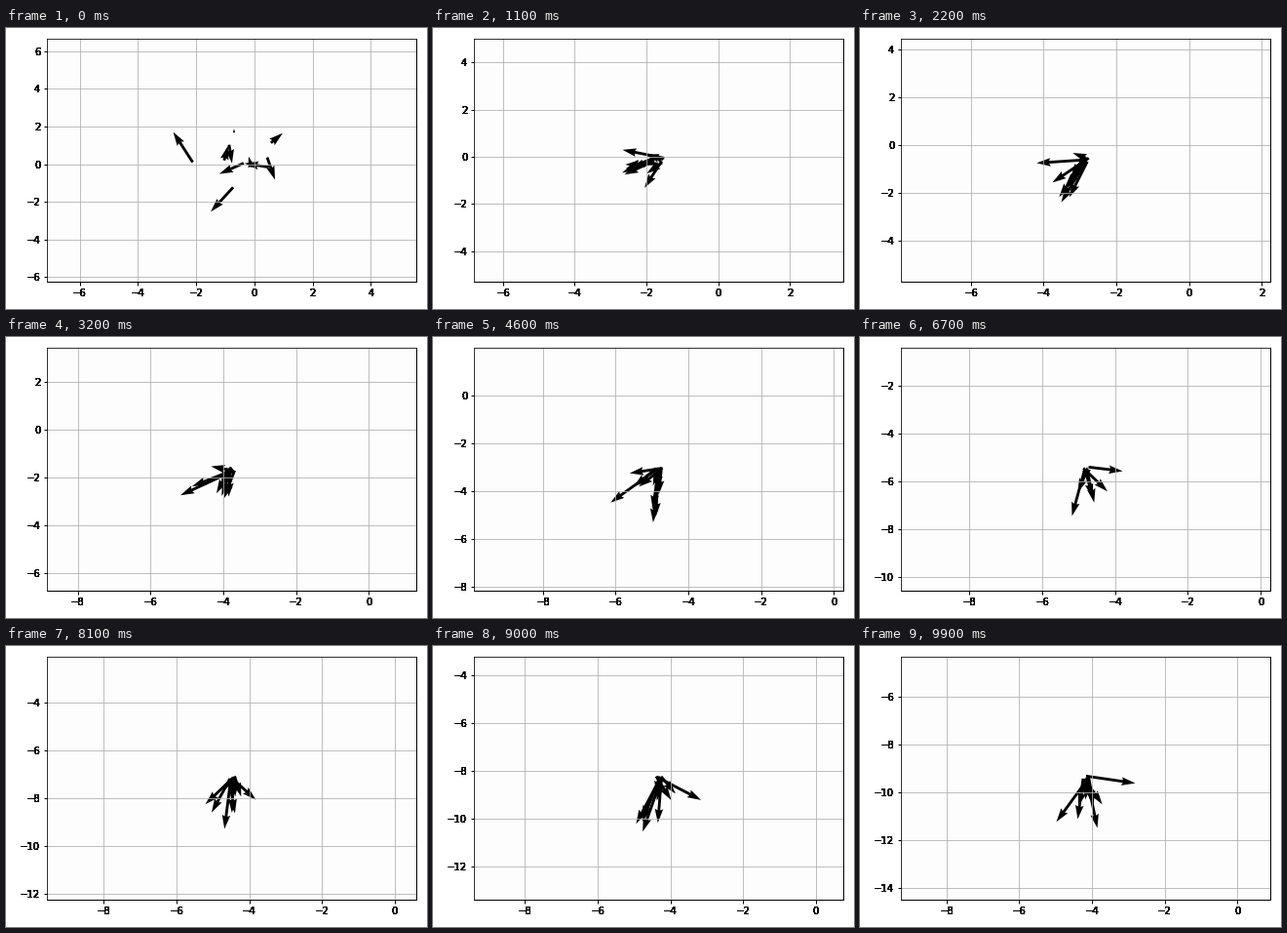
Recreate the animation shown at these times as a matplotlib script. Size 432 by 288 pixels, loop 10 s.

```python
import numpy as np
import matplotlib.pyplot as plt
from matplotlib.animation import FuncAnimation
from matplotlib.artist import Artist

W, H, DPI = 432, 288, 72
FRAMES, AGENTS, MARGIN = 100, 10, 5
EXTENT = np.array([0.075, 0.08])  # half size of the gathered flock

# Starting state of each agent: x, y and heading in points
START = np.array([(-2.12, 0.10, -20, 31), (-0.37, 0.05, -25, -11), (0.50, -0.16, -25, 4),
                  (-0.73, -1.23, -23, -25), (-1.04, 0.20, 4, 15), (-0.10, -0.16, -3, 11),
                  (-0.87, 1.03, 3, -19), (0.44, 0.36, 8, -23), (-0.70, 1.67, 0, 4),
                  (0.57, 1.13, 12, 10)])

# Step, x and y of the points that the flock passes
ROUTE = np.array([(0, -0.35, 0.10), (22, -2.845, -0.64), (32, -3.763, -1.635),
                  (46, -4.813, -3.09), (67, -4.805, -5.483), (81, -4.48, -7.173),
                  (99, -4.17, -9.40)])

rng = np.random.default_rng(4)


def smooth_path(t, keys, steps):
    """Cubic curve through the key points."""
    slope = np.gradient(keys, t, axis=0)
    i = np.clip(np.searchsorted(t, steps, side="right") - 1, 0, len(t) - 2)
    span = (t[i + 1] - t[i])[:, None]
    s = (steps - t[i])[:, None] / span
    rise = s * s * (3 - 2 * s)
    bend = s * (1 - s) ** 2 * slope[i] + s * s * (s - 1) * slope[i + 1]
    return keys[i] + rise * (keys[i + 1] - keys[i]) + span * bend


def noise(*shape):
    """Random values of unit spread that drift over three steps."""
    raw = rng.normal(size=(FRAMES, AGENTS) + shape)
    return (np.roll(raw, 1, axis=0) + raw + np.roll(raw, -1, axis=0)) / np.sqrt(3)


centre = smooth_path(ROUTE[:, 0], ROUTE[:, 1:], np.arange(FRAMES))
drift = np.gradient(centre, axis=0)
fade = np.exp(-np.arange(FRAMES) / 5)[:, None, None]

spots = noise(2)
low, high = spots.min(axis=1, keepdims=True), spots.max(axis=1, keepdims=True)
spots = EXTENT * (2 * (spots - low) / (high - low) - 1)
pos = centre[:, None] + fade * (START[:, :2] - centre[0]) + (1 - fade) * spots

# Headings fan out around the direction of the drift
angle = np.arctan2(drift[:, 1], drift[:, 0])[:, None] + 0.5 * noise()
length = np.clip(33 + 15 * noise(), 3, 60)
fan = length[..., None] * np.stack([np.cos(angle), np.sin(angle)], axis=-1)
heading = fade * START[:, 2:] + (1 - fade) * fan


class DarkLabels(Artist):
    """Repaints the tick labels so that their soft edges turn black."""

    def draw(self, renderer):
        for axis in (ax.xaxis, ax.yaxis):
            for label in axis.get_ticklabels():
                for _ in range(12):
                    label.draw(renderer)


fig = plt.figure(figsize=(W / DPI, H / DPI), dpi=DPI, facecolor="white")
ax = fig.add_axes([42.3 / W, 28.2 / H, 378.9 / W, 249 / H], facecolor="#fdfdfd")
ax.grid(True)
ax.tick_params(width=1, labelsize=10, labelfontfamily="DejaVu Sans")
for side in ("right", "bottom"):
    ax.spines[side].set_linewidth(1)
fig.add_artist(DarkLabels())

quiver = ax.quiver(*pos[0].T, *heading[0].T, color="black",
                   angles="uv", scale_units="inches", scale=72)


def ticks(lo, hi):
    return np.arange(2 * np.ceil(lo / 2), hi, 2)


def update(n):
    quiver.set_offsets(pos[n])
    quiver.set_UVC(*heading[n].T)
    (x0, y0), (x1, y1) = pos[n].min(axis=0) - MARGIN, pos[n].max(axis=0) + MARGIN
    ax.set_xticks(ticks(x0, x1))
    ax.set_yticks(ticks(y0, y1))
    ax.set_xlim(x0, x1)
    ax.set_ylim(y0, y1)
    return (quiver,)


anim = FuncAnimation(fig, update, frames=FRAMES, interval=100, repeat=True,
                     repeat_delay=0, blit=False)
plt.show()
```
